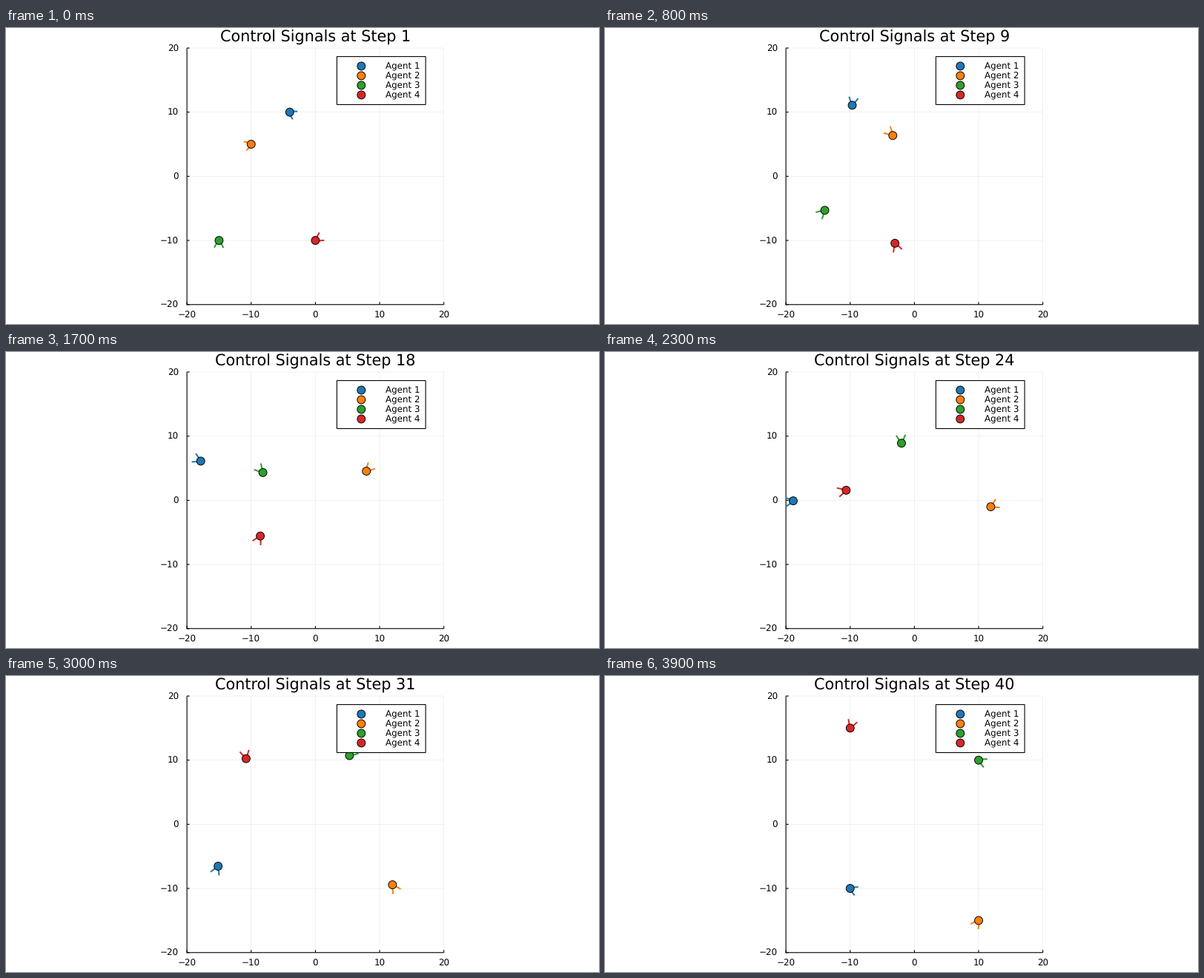
A matplotlib script for the animation above (4 s loop, 800 by 400 pixels).

```python
from math import comb

import numpy as np
import matplotlib.pyplot as plt
from matplotlib.animation import FuncAnimation
from matplotlib.patches import Circle, Rectangle

W, H, DPI = 800, 400, 100
PX = 72 / DPI                       # points per pixel
STEPS = 40
CENTER = np.array([417.4, 200.4])   # pixel position of the data origin
UNIT = np.array([8.665, -8.668])    # pixels per data unit
WING_BACK, WING_SIDE, THRUST = 11.8, 6.2, 1.2

# Per agent: colour, start, three points that pull the path, end
AGENTS = [
    ("#1f77b4", (-4, 10), (-17.8, 18.3), (-25.9, 1.6), (-21.4, -5), (-10, -10)),
    ("#ff7f0e", (-10, 5), (5.25, 9.5), (17, 10.5), (15, -7.7), (10, -15)),
    ("#2ca02c", (-15, -10), (-14.7, -0.4), (-7.7, 11.4), (2.8, 13.15), (10, 10)),
    ("#d62728", (0, -10), (-6.4, -14), (-13.8, -7.85), (-11.75, 10), (-10, 15)),
]


def to_px(points):
    return CENTER + UNIT * np.asarray(points, float)


def bezier(points, s):
    n = len(points) - 1
    return sum(comb(n, i) * s**i * (1 - s)**(n - i) * p
               for i, p in enumerate(points))


class Agent:
    """Moves from rest to rest; its arrow shows the acceleration."""

    def __init__(self, color, start, *rest):
        # doubled end points give zero speed at both ends
        self.path = to_px([start, start, *rest, rest[-1]])
        n = len(self.path) - 1
        self.accel = n * (n - 1) * np.diff(self.path, 2, axis=0) / (STEPS - 1)**2
        self.arrow, = ax.plot([], [], color=color, lw=2 * PX, zorder=3,
                              solid_capstyle="butt", solid_joinstyle="miter")
        self.arrow.set_clip_path(frame)
        self.dot = dot(0, 0, color, 4)

    def move(self, s):
        pos = bezier(self.path, s)
        push = bezier(self.accel, s)
        ahead = push / np.hypot(*push)
        side = WING_SIDE * np.array([-ahead[1], ahead[0]])
        tip = pos + THRUST * push
        back = tip - WING_BACK * ahead
        self.arrow.set_data(*np.transpose([back + side, tip, back - side]))
        self.dot.center = pos


def dot(x, y, color, z):
    return ax.add_patch(Circle((x, y), 5.45, fc=color, ec="black",
                               lw=0.95 * PX, zorder=z, snap=False))


def line(xs, ys, width=1.1, alpha=1, z=2):
    ax.plot(xs, ys, color="black", lw=width * PX, alpha=alpha, zorder=z,
            solid_capstyle="butt", snap=False)


def label(x, y, s, size=11.94, ha="center"):
    return ax.text(x, y, s, fontsize=size * PX, ha=ha, va="baseline", zorder=7)


plt.rcParams["font.family"] = "DejaVu Sans"
plt.rcParams["text.hinting"] = "none"
fig = plt.figure(figsize=(W / DPI, H / DPI), dpi=DPI, facecolor="white")
ax = fig.add_axes([0, 0, 1, 1])
ax.set_xlim(0, W)
ax.set_ylim(H, 0)
ax.axis("off")

(left, bottom), (right, top) = to_px([(-20, -20), (20, 20)])
frame = Rectangle((left, top), right - left, bottom - top,
                  transform=ax.transData)

# Grid, axes and ticks
for value in range(-20, 21, 10):
    x, y = to_px((value, value))
    line([x, x], [top, bottom], 0.55, 0.1, 1)
    line([left, right], [y, y], 0.55, 0.1, 1)
    line([x, x], [bottom, bottom - 3.5])
    line([left, left + 3.5], [y, y])
    name = str(value).replace("-", "\u2212")
    label(x, 391.4, name)
    label(233.2, y + 4.4, name, ha="right")
line([left, left], [top, bottom + 0.5])
line([left - 0.5, right], [bottom, bottom])

# Legend
ax.add_patch(Rectangle((446.4, 38.6), 119.7, 64.9, fc="white", ec="black",
                       lw=1.1 * PX, zorder=5, snap=False))
for k, (color, *_) in enumerate(AGENTS):
    y = 51.5 + 13 * k
    dot(479.3, y, color, 6)
    label(512.4, y + 4.2, f"Agent {k + 1}", ha="left")

title = label(CENTER[0], 18.3, "", 20.8)
agents = [Agent(*spec) for spec in AGENTS]


def update(i):
    title.set_text(f"Control Signals at Step {i + 1}")
    for agent in agents:
        agent.move(i / (STEPS - 1))
    return []


anim = FuncAnimation(fig, update, frames=STEPS, interval=100, repeat=True,
                     repeat_delay=0, blit=False)
plt.show()
```
